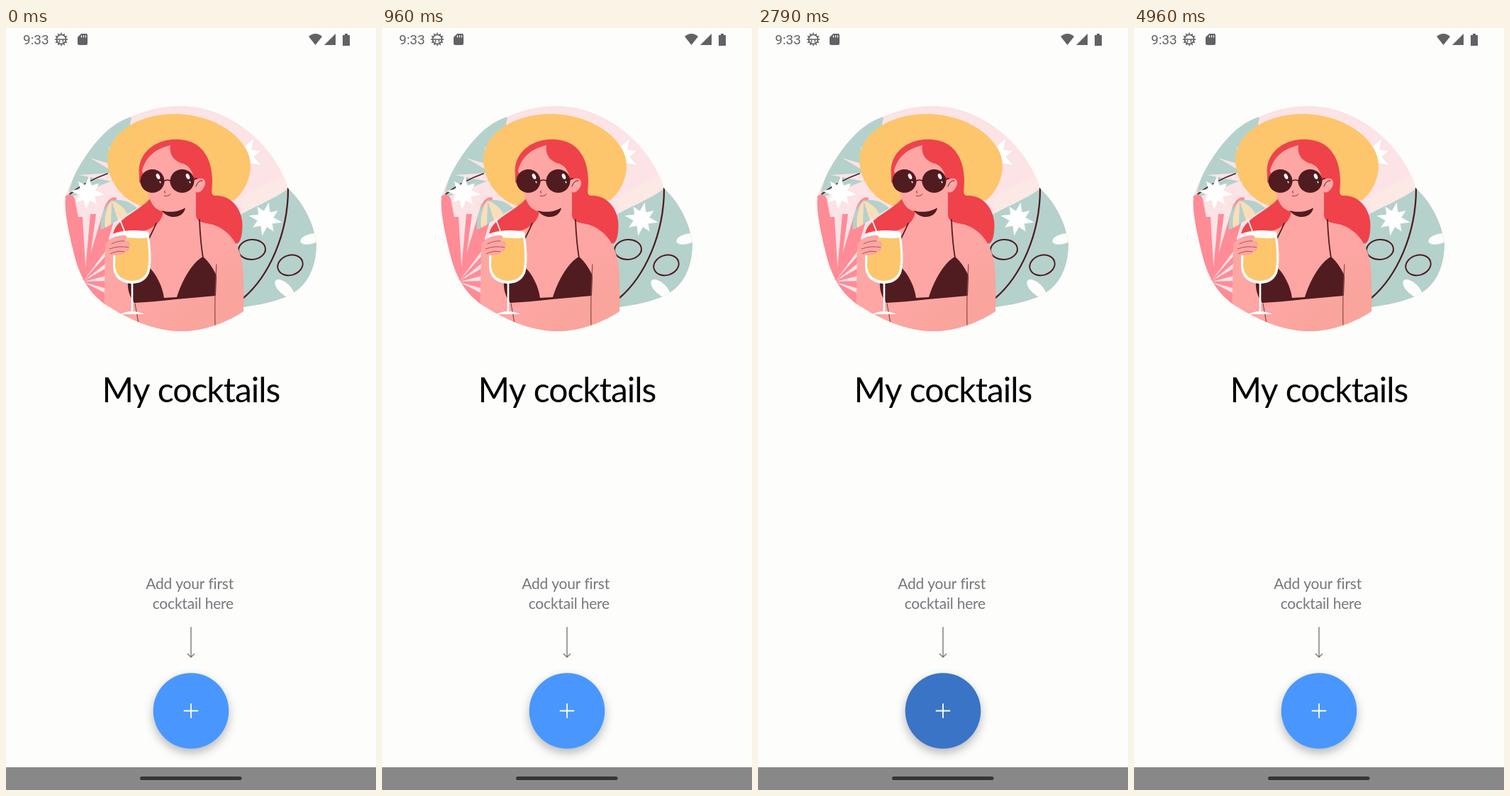
An HTML page with a canvas for the animation above (5000 ms loop, 522 px wide and 1073 px high).

```html
<!DOCTYPE html>
<html lang="en">
<head>
<meta charset="utf-8">
<title>My cocktails</title>
<style>
html, body { margin: 0; width: 100%; height: 100%; overflow: hidden; background: #fdfdfc; }
canvas { display: block; width: 522px; height: 1073px; }
</style>
</head>
<body>
<canvas id="stage" width="522" height="1073"></canvas>
<script>
const ctx = document.getElementById('stage').getContext('2d');
const LOOP = 5000;
const PAPER = '#fdfdfc', TEAL = '#b5d1cc', CREAM = '#f9dfb9', BLUSH = '#fbe3e6', CORAL = '#ff8b97';
const SKIN = '#fda6a4', HAIR = '#f0424a', DARK = '#501c20', GOLD = '#fdc66c', ICON = '#626265';

const fill = (d, color) => { ctx.fillStyle = color; ctx.fill(new Path2D(d)); };

function line(d, color = DARK, width = 2) {
  ctx.strokeStyle = color;
  ctx.lineWidth = width;
  ctx.stroke(new Path2D(d));
}

function oval(x, y, rx, ry, color, angle = 0, strokeWidth = 0) {
  ctx.beginPath();
  ctx.ellipse(x, y, rx, ry, angle, 0, Math.PI * 2);
  if (strokeWidth) {
    ctx.strokeStyle = color;
    ctx.lineWidth = strokeWidth;
    ctx.stroke();
  } else {
    ctx.fillStyle = color;
    ctx.fill();
  }
}

function star(x, y, radius, turn) {
  ctx.beginPath();
  for (let i = 0; i < 16; i++) {
    const r = i % 2 ? radius * 0.48 : radius * (i % 4 ? 0.88 : 1);
    const a = turn + i * Math.PI / 8;
    ctx.lineTo(x + r * Math.cos(a), y + r * Math.sin(a));
  }
  ctx.fillStyle = '#fff';
  ctx.fill();
}

function text(str, x, y, font, color, align = 'left', spacing = 0) {
  ctx.font = font;
  ctx.letterSpacing = spacing + 'px';
  ctx.fillStyle = color;
  ctx.textAlign = align;
  ctx.fillText(str, x, y);
}

const blob = new Path2D('M84 238 C92 210 130 137 177 125 C225 103 277 105 319 130 C357 152 386 187 398 226 C420 246 435 277 438 304 C438 337 425 364 400 376 C383 385 357 390 335 393 L335 399 C302 421 267 428 244 427 C207 426 171 409 143 391 C112 371 101 341 94 310 C87 281 82 253 84 238Z');

function drawBackdrop() {
  ctx.fillStyle = BLUSH;
  ctx.fillRect(80, 105, 362, 326);
  fill('M330 240 L398 202 L400 228 L336 262Z', '#fce8e5');

  // left leaf with pale gaps
  fill('M88 237 C95 195 132 139 177 125 L172 151 L145 169 L150 215 L92 238Z', TEAL);
  fill('M119 183 L149 192 L149 201Z M103 207 L149 204 L149 216Z', BLUSH);
  line('M90 234 Q112 216 143 205', DARK, 1.8);

  // fan of coral petals
  fill('M82 238 C88 232 95 234 97 241 C105 280 111 320 113 352 L104 364 L80 300Z', CORAL);
  fill('M156 239 C148 237 143 243 139 252 L109 352 L116 354 C137 319 156 278 156 239Z', CORAL);
  fill('M102 266 L108 266 L113 350 L109 350Z M119 262 L127 262 L115 350 L111 350Z', CORAL);
  fill('M108 350 L145 290 L145 395 L100 365Z', CORAL);
  for (let i = 0; i < 4; i++) {
    const y = 308 + i * 20;
    fill(`M110 ${355 + i} L145 ${y} L145 ${y + 8}Z`, BLUSH);
  }

  star(115, 232, 24, 0.1);
  star(336, 180, 27, 0.5);

  // right leaf
  fill('M325 266 C350 251 377 242 398 226 L440 260 L440 395 L325 396Z', TEAL);
  oval(430, 297, 15, 7, PAPER, -0.25);
  oval(393, 367, 17, 8, PAPER, 0.75);
  star(366, 269, 24, 0.2);
  line('M398 226 C398 290 371 350 334 381', DARK, 2.3);
  oval(347, 312, 19, 14, DARK, -0.08, 2);
  oval(401, 334, 18, 14, DARK, -0.3, 2);
}

function drawWoman() {
  fill('M143 185 C145 145 190 121 238 121 C295 121 345 156 345 194 C345 213 336 230 323 242 L190 250 C165 243 143 215 143 185Z', GOLD);
  fill('M188 207 C184 174 215 154 245 157 C279 159 291 187 291 216 C291 230 287 237 298 236 C322 237 337 261 333 287 C332 301 326 308 319 301 L262 270 L205 292 L151 294 C150 268 194 257 207 235 L188 217Z', HAIR);

  const body = ctx.createLinearGradient(140, 280, 250, 425);
  body.addColorStop(0, SKIN);
  body.addColorStop(0.7, SKIN);
  body.addColorStop(1, '#f9a49c');
  fill('M223 251 L268 231 L268 264 C269 274 280 274 292 277 C319 286 334 311 335 349 L336 430 L138 430 L140 303 C157 293 184 289 200 284 C210 279 222 273 223 251Z', body);

  // face
  fill('M192 201 C197 181 211 170 232 165 C229 183 244 190 250 191 C261 195 264 205 265 215 C278 207 285 215 279 225 C275 232 270 232 267 231 C260 251 237 258 222 258 C208 257 202 242 199 227Z', SKIN);
  line('M268 223 Q271 214 277 215', DARK, 1);
  fill('M220 257 C231 261 246 258 253 253 C251 268 229 271 220 257Z', DARK);
  for (const x of [206.5, 248.5]) {
    oval(x, 215.5, 17, 16.5, DARK);
    oval(x + 8, 209, 2.4, 4.2, '#fff', -0.4);
    oval(x + 11, 217, 0.8, 1.6, '#fff', -0.4);
  }
  line('M222 216 Q228 212 233 216 M264 213 L269 212', DARK, 1.7);
  line('M225 233 Q222 231 224 229 M223 236 Q228 238 232 234', '#843e41', 1);

  // bikini
  fill('M203 338 C212 347 221 364 223 380 L241 379 C247 359 262 330 278 322 C285 328 293 339 297 349 L296 377 L240 382 Q205 386 181 387 C174 378 171 367 172 356Z', DARK);
  line('M273 270 Q274 299 278 324 M212 275 Q207 286 202 296', DARK, 1.8);
  line('M297 333 Q294 374 295 418 M182 388 L187 416', '#843e41', 1.1);
}

function drawDrink() {
  line('M160 268 L169 291', '#fff', 1.8);
  fill('M149 243 C137 252 132 268 134 284 L146 278 L159 270 L171 262 L185 254 C176 244 161 240 149 243Z', TEAL);
  fill('M149 243 C141 254 138 270 140 281 L148 277Z M149 243 L158 271 L171 262 C168 254 160 247 149 243Z', CREAM);

  fill('M151 290 C164 284 190 284 201 287 C205 311 206 332 202 345 C197 357 187 360 177 360 C161 359 151 351 151 334Z', '#fff');
  fill('M155 298 C168 291 185 299 199 295 C202 315 202 331 199 343 C195 354 184 356 177 356 C164 355 155 349 154 335Z', GOLD);
  line('M178 359 L178 400', '#fff', 2.6);
  fill('M161 403 Q178 395 195 403Z', '#fff');

  fill('M140 306 C145 297 153 292 166 292 C172 292 172 297 166 299 C174 299 178 304 173 308 C176 312 172 315 167 315 C167 320 157 320 150 320 L140 325Z', SKIN);
  line('M149 304 Q159 299 167 300 M146 311 Q160 306 173 309 M147 318 Q157 313 167 315', '#a85458', 1);
}

function drawStatusBar() {
  text('9:33', 24, 23, '19px Roboto, sans-serif', ICON);

  oval(78, 16, 6.6, 6.6, ICON, 0, 1.8);
  for (let i = 0; i < 12; i++) {
    const a = i * Math.PI / 6, c = Math.cos(a), s = Math.sin(a);
    line(`M${78 + 7 * c} ${16 + 7 * s} L${78 + 8.6 * c} ${16 + 8.6 * s}`, ICON, 1.6);
  }
  line('M72 16 H84 M75.5 16 V20 M80.5 16 V20', ICON, 1.4);

  fill('M106 8 H113 Q115 8 115 10 V22 Q115 24 113 24 H103 Q101 24 101 22 V13Z', ICON);
  line('M106.5 10.5 V13 M109.5 10.5 V13 M112.5 10.5 V13', PAPER, 1.2);
  fill('M427 12 Q436.5 4 446 12 L436.5 24Z', ICON);
  fill('M465 8 V24 H449Z', ICON);
  fill('M478 8 H482 V10 H485 V25 H475 V10 H478Z', ICON);
}

function ease(t, from, to) {
  const p = Math.min(1, Math.max(0, (t - from) / (to - from)));
  return p * p * (3 - 2 * p);
}

function drawButton(t) {
  const press = ease(t, 2450, 2700) - ease(t, 3000, 3250);
  const mix = (a, b) => Math.round(a + (b - a) * press);
  ctx.save();
  ctx.shadowColor = 'rgba(0,0,0,0.28)';
  ctx.shadowBlur = 14;
  ctx.shadowOffsetY = 6;
  oval(261, 961.5, 53.3, 53.3, `rgb(${mix(73, 57)},${mix(151, 116)},${mix(254, 198)})`);
  ctx.restore();
  line('M251.5 961.5 H270.5 M261 952 V971', '#fff', 1.8);
}

function draw(t) {
  ctx.fillStyle = PAPER;
  ctx.fillRect(0, 0, 522, 1073);
  drawStatusBar();

  ctx.save();
  ctx.clip(blob);
  drawBackdrop();
  drawWoman();
  drawDrink();
  ctx.restore();

  text('My cocktails', 261, 527, '400 48px Lato, sans-serif', '#050505', 'center', -1);
  const hintFont = '400 21px Lato, sans-serif';
  text('Add your first', 321, 790, hintFont, '#77777b', 'right', -0.2);
  text('cocktail here', 321, 818, hintFont, '#77777b', 'right', -0.2);
  line('M261 844 V885 M256.5 881.5 L261 886 L265.5 881.5', '#77777a', 1.4);
  drawButton(t);

  ctx.fillStyle = '#888888';
  ctx.fillRect(0, 1041, 522, 32);
  line('M191.5 1056.5 H330', '#353535', 5);
}

ctx.lineCap = 'round';
ctx.lineJoin = 'round';
const start = performance.now();
function tick() {
  draw((performance.now() - start) % LOOP);
  requestAnimationFrame(tick);
}
tick();
</script>
</body>
</html>
```
